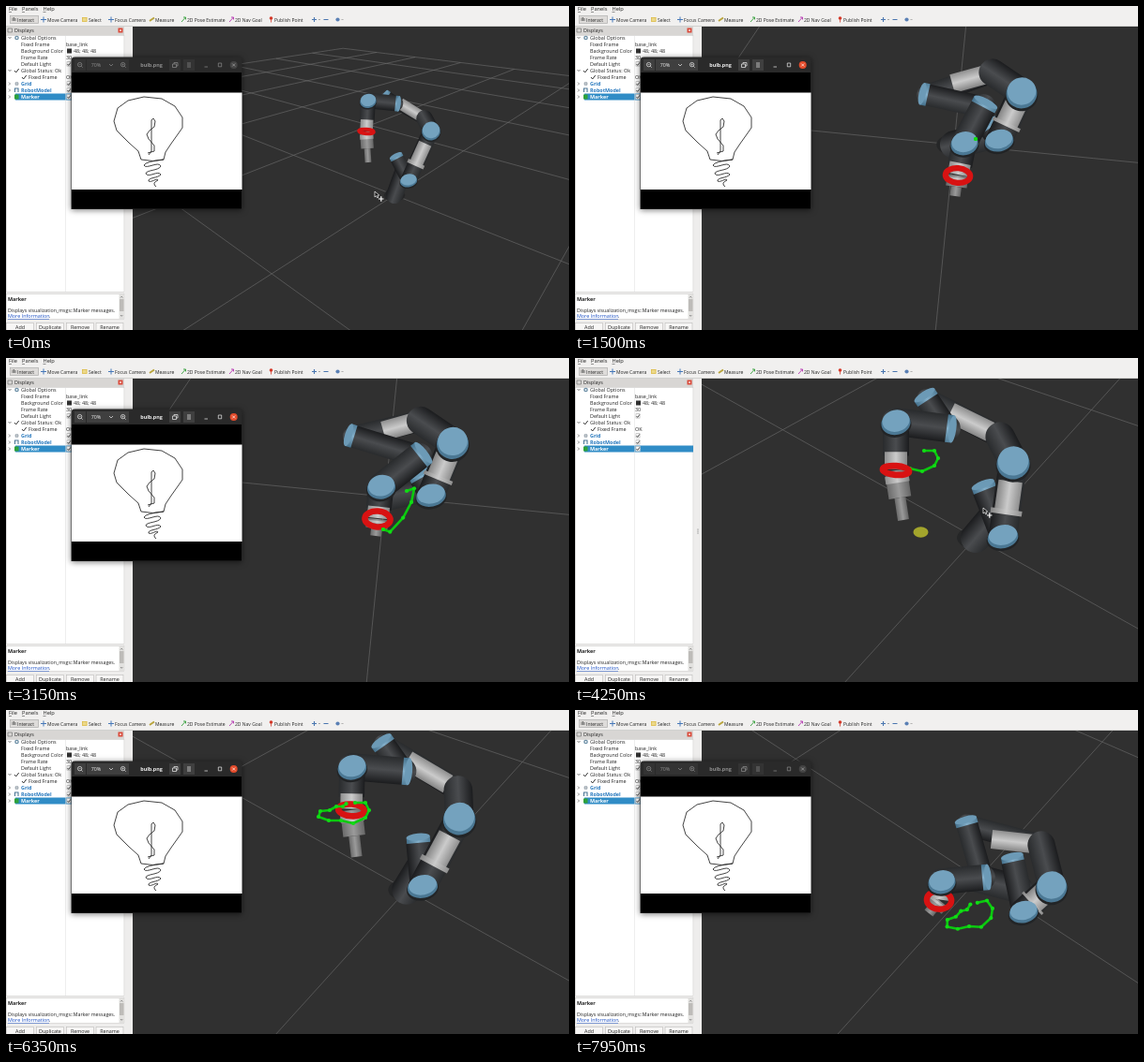
These frames come from a looping animation (600x346 px, 8000 ms). An HTML page with a canvas:

```html
<!DOCTYPE html>
<html lang="en">
<head>
<meta charset="utf-8">
<title>Robot arm drawing</title>
<style>
html, body { margin: 0; width: 100%; height: 100%; overflow: hidden; background: #303030; }
canvas { display: block; width: 600px; height: 346px; }
</style>
</head>
<body>
<canvas id="stage" width="600" height="346"></canvas>
<script>
const g = document.getElementById('stage').getContext('2d');
const LOOP = 8000, FOCAL = 391, CENTER = [367, 184];

const mix = (a, b, k) => a + (b - a) * k;
const mixList = (a, b, k) => a.map((v, i) => mix(v, b[i], k));
const smooth = k => k * k * (3 - 2 * k);

// keys: [time, value list]; eased between neighbours, held at the end
function sample(keys, t) {
  const n = keys.findIndex(key => key[0] > t);
  if (n < 0) return keys[keys.length - 1][1];
  const [t0, a] = keys[n - 1], [t1, b] = keys[n];
  return mixList(a, b, smooth((t - t0) / (t1 - t0)));
}

// ---------- basic drawing ----------
function box(x, y, w, h, fill, stroke) {
  if (fill) { g.fillStyle = fill; g.fillRect(x, y, w, h); }
  if (stroke) { g.strokeStyle = stroke; g.lineWidth = .6; g.strokeRect(x + .5, y + .5, w - 1, h - 1); }
}
function dot(x, y, r, fill) {
  g.fillStyle = fill; g.beginPath(); g.arc(x, y, r, 0, 7); g.fill();
}
function poly(points, color, width = .7) {
  g.strokeStyle = color; g.lineWidth = width;
  g.beginPath(); points.forEach(p => g.lineTo(p[0], p[1])); g.stroke();
}
function path(d, color, width = .7) {
  g.strokeStyle = color; g.lineWidth = width; g.stroke(new Path2D(d));
}
function text(s, x, y, { size = 5.4, color = '#222', bold = false, align = 'left' } = {}) {
  g.font = `${bold ? 'bold ' : ''}${size}px "Open Sans", sans-serif`;
  g.textAlign = align; g.fillStyle = color; g.fillText(s, x, y);
}

// ---------- cameras: pitch, yaw, distance, base x, y, then trail transform ----------
const FAR = [.47, .72, 2.4, 414, 202, 402, 183, .73, -.74, -.25, 1.96];
const TOP = [.95, .13, 1.35, 404, 148, 402, 183, .73, -.74, -.25, 1.96];
const SIDE = [.85, .67, 1.2, 427, 192, 357, 118, 1, 0, 0, 1];
const TILT = [1, .7, 1.3, 430, 180, 420, 231, .93, .27, -.21, 1.16];
const cameraKeys = [[0, FAR], [1450, TOP], [3450, TOP], [4250, SIDE], [7200, SIDE], [7650, TILT]];

function drawGrid([pitch, yaw, dist, ox, oy]) {
  const sp = Math.sin(pitch), cp = Math.cos(pitch), sy = Math.sin(yaw), cy = Math.cos(yaw);
  const x0 = (ox - CENTER[0]) / FOCAL * dist, y0 = (CENTER[1] - oy) / FOCAL * dist;
  const project = (x, y) => {
    const right = x * cy + y * sy, ahead = y * cy - x * sy, z = dist + ahead * cp;
    return z < .12 ? null : [CENTER[0] + FOCAL * (x0 + right) / z, CENTER[1] - FOCAL * (y0 + ahead * sp) / z];
  };
  for (let i = -5; i <= 5; i++) {
    const along = [], across = [];
    for (let j = -5; j <= 5; j += .25) { along.push(project(i, j)); across.push(project(j, i)); }
    poly(along.filter(Boolean), '#747474', .55);
    poly(across.filter(Boolean), '#747474', .55);
  }
}

// ---------- arm ----------
// unit, then: base disc, shoulder cap, elbow disc, elbow back, forearm end,
// wrist cap, second wrist cap, tool top, ring, gripper tip
const REST = [9, 429, 186, 417, 163, 453, 133, 446, 120, 420, 104, 406, 98, 415, 104, 386, 101, 384, 134, 386, 167];
const START = [15, 452, 143, 443, 130, 476, 92, 445, 71, 402, 83, 376, 95, 435, 108, 415, 146, 408, 181, 405, 203];
const ARC = [15.5, 453, 146, 443, 128, 476, 90, 442, 67, 402, 78, 371, 84, 440, 105, 400, 137, 396, 172, 394, 190];
const BOTTOM = [16, 456, 190, 437, 141, 467, 111, 453, 84, 400, 58, 376, 45, 396, 75, 342, 68, 342, 120, 350, 173];
const LEFT = [16, 457, 190, 443, 143, 501, 112, 484, 84, 437, 59, 409, 44, 438, 74, 383, 65, 381, 121, 384, 173];
const CLOSED = [15.5, 433, 186, 437, 141, 468, 118, 480, 87, 420, 49, 399, 33, 410, 58, 357, 57, 357, 95, 365, 143];
const STEM = [15, 478, 215, 467, 162, 508, 188, 497, 144, 444, 138, 418, 123, 434, 179, 391, 183, 388, 203, 377, 217];
const poseKeys = [[0, REST], [1500, START], [3150, ARC], [3450, ARC], [4250, BOTTOM],
  [5400, LEFT], [7200, CLOSED], [7650, STEM]];

const DARK = ['#1b1c1e', '#4a4c4f', '#292b2d'], LIGHT = ['#858585', '#cbcbcb', '#8f8f8f'];
const BLUE = ['#45718c', '#83afca', '#537f99'], GRAY = ['#666', '#9a9a9a', '#6b6b6b'];
const between = (a, b, k) => mixList(a, b, k);

function tube(a, b, w, colors, cap = 'butt') {
  const dx = b[0] - a[0], dy = b[1] - a[1], len = Math.hypot(dx, dy) || 1;
  const nx = -dy / len * w / 2, ny = dx / len * w / 2;
  const shade = g.createLinearGradient(a[0] - nx, a[1] - ny, a[0] + nx, a[1] + ny);
  colors.forEach((c, i) => shade.addColorStop(i / 2, c));
  g.lineCap = cap;
  poly([a, b], shade, w);
  g.lineCap = 'butt';
}
function endCap(from, to, unit, w) {
  const a = Math.atan2(to[1] - from[1], to[0] - from[0]);
  const out = [to[0] + Math.cos(a) * unit * .4, to[1] + Math.sin(a) * unit * .4];
  tube(to, out, w, BLUE);
  g.fillStyle = '#6c9ab6';
  g.beginPath(); g.ellipse(out[0], out[1], unit * .25, w / 2, a, 0, 7); g.fill();
}
function disc(p, r, squash = .8) {
  const oval = (dy, scale, fill) => {
    g.fillStyle = fill;
    g.beginPath(); g.ellipse(p[0], p[1] + dy, r * scale, r * squash * scale, -.2, 0, 7); g.fill();
  };
  oval(r * .22, 1.06, '#222426');
  oval(r * .1, 1, '#4b7894');
  oval(-r * .06, .93, '#74a2be');
}

function drawBody(p, u, ground) {
  const [base, shoulder, elbow, back, foreEnd, wrist] = p;
  g.fillStyle = '#252627';
  g.beginPath(); g.ellipse(ground[0], ground[1], u * 1.25, u * .75, 0, 0, 7); g.fill();
  tube(ground, between(base, shoulder, .45), u * 2, DARK, 'round');
  tube(base, shoulder, u * 1.7, DARK);
  endCap(base, shoulder, u, u * 1.6);
  tube(base, elbow, u * 1.9, DARK, 'round');
  tube(between(base, elbow, .34), between(base, elbow, .74), u * 1.6, LIGHT);
  tube(between(base, elbow, .29), between(base, elbow, .36), u * 2.1, LIGHT);
  disc(base, u * 1.03, .7);
  tube(back, wrist, u * 1.5, DARK, 'round');
  tube(between(back, foreEnd, .2), foreEnd, u * 1.35, LIGHT);
  tube(back, elbow, u * 1.95, DARK, 'round');
  disc(elbow, u * 1.1, .95);
}
function drawWrist(p, u) {
  const [wrist, side, top, ring, tip] = p.slice(5);
  tube(wrist, side, u * 1.55, DARK, 'round');
  endCap(side, wrist, u, u * 1.6);
  tube(side, top, u * 1.85, DARK, 'round');
  endCap(top, side, u, u * 1.85);

  const palm = between(ring, tip, .55);
  tube(ring, palm, u * 1.5, GRAY);
  tube(palm, tip, u * .75, GRAY);
  tube(between(ring, tip, .1), between(ring, tip, .25), u * 1.6, LIGHT);
  tube(top, between(top, ring, .7), u * 1.75, DARK);
  tube(between(top, ring, .62), between(top, ring, .97), u * 1.5, LIGHT);

  const len = Math.hypot(ring[0] - top[0], ring[1] - top[1]) / (3.6 * u);
  const open = Math.max(.25, .7 * Math.sqrt(Math.max(0, 1 - len * len)));
  g.strokeStyle = '#d81212'; g.lineWidth = u * .42;
  g.beginPath(); g.ellipse(ring[0], ring[1], u * .88, u * open, .08, 0, 7); g.stroke();
  disc(top, u * .98, .8);
}

// ---------- drawn trail ----------
const TRAIL = [[372, 99], [383, 99], [387, 107], [383, 115], [370, 121], [357, 118], [344, 118],
  [333, 114], [335, 108], [345, 107], [352, 103], [359, 103], [364, 99]];
const trailKeys = [[0, [0]], [1500, [0]], [3150, [5]], [4250, [5.3]], [5400, [11.4]], [7200, [12]]];

function drawTrail(camera, t) {
  const [tx, ty, a, b, c, d] = camera.slice(5), [count] = sample(trailKeys, t);
  if (!count) return;
  const whole = Math.floor(count), points = TRAIL.slice(0, whole + 1);
  if (count > whole) points.push(between(TRAIL[whole], TRAIL[whole + 1], count - whole));
  const seen = points.map(([x, y]) => [tx + a * (x - 357) + b * (y - 118), ty + c * (x - 357) + d * (y - 118)]);
  g.lineCap = g.lineJoin = 'round';
  poly(seen, '#0bc90f', 2.6);
  g.lineCap = 'butt';
  seen.forEach(p => dot(p[0], p[1], 2.1, '#11dc15'));
}

function drawScene(t) {
  const camera = sample(cameraKeys, t), [unit, ...flat] = sample(poseKeys, t);
  const joints = Array.from({ length: 10 }, (_, i) => flat.slice(2 * i, 2 * i + 2));
  const trailInFront = t < 3500 || t > 6000;
  g.save();
  g.beginPath(); g.rect(135, 22, 465, 324); g.clip();
  box(135, 22, 465, 324, '#303030');
  drawGrid(camera);
  const orbiting = (t > 50 && t < 1400) || (t > 3500 && t < 4300) || (t > 7250 && t < 7600);
  if (orbiting) {
    g.fillStyle = '#a3a52c';
    g.beginPath(); g.ellipse(368.5, 186, 8, 5.8, 0, 0, 7); g.fill();
  }
  drawBody(joints, unit, [camera[3], camera[4]]);
  if (!trailInFront) drawTrail(camera, t);
  drawWrist(joints, unit);
  if (trailInFront) drawTrail(camera, t);
  g.restore();
}

// ---------- interface ----------
const TOOLS = [['Interact', 12, '#777'], ['Move Camera', 44, '#4778b8'], ['Select', 88, '#d9b640'],
  ['Focus Camera', 116, '#4778b8'], ['Measure', 159, '#b9a43c'], ['2D Pose Estimate', 193, '#35a03a'],
  ['2D Nav Goal', 244, '#b535b0'], ['Publish Point', 286, '#d43a2a']];
const ROWS = [['Global Options'], ['Fixed Frame', 'base_link'], ['Background Color', '48; 48; 48'],
  ['Frame Rate', '30'], ['Default Light', true], ['Global Status: Ok'], ['Fixed Frame', 'OK'],
  ['Grid', true], ['RobotModel', true], ['Marker', true]];

function drawTool([label, x, color], i) {
  if (i === 0) { box(4, 10, 31, 9, '#dedcda', '#aaa'); path('M7 16V12.5M8.5 16V12M10 16V13', '#555', .8); }
  else if (i === 2) box(x - 7, 12, 5.5, 5, '#ecd98a', color);
  else if (i === 1 || i === 3) path(`M${x - 7} 14.5H${x - 1}M${x - 4} 11.5V17.5`, color, 1);
  else if (i === 4) path(`M${x - 6} 16L${x - 1} 12.5`, color, 2);
  else if (i === 7) { dot(x - 3.5, 13, 1.8, color); path(`M${x - 3.5} 14V17.5`, color, .8); }
  else path(`M${x - 6} 17L${x - 1.5} 12M${x - 4} 12H${x - 1.5}V14.5`, color, .9);
  text(label, x, 16.7, { size: 5 });
}

function drawCheck(y) {
  box(64.5, y - 2.8, 5, 5.4, '#fff', '#aaa');
  path(`M65.5 ${y}l1.2 1.4 2.2-3`, '#222', .8);
}

function drawRow([label, value], i) {
  const y = 34 + 7 * i, display = i > 6, chosen = i === 9;
  if (chosen) box(10, y - 3.5, 116, 7, '#308cc6');
  if ([0, 5].includes(i)) path(`M2.5 ${y - 1}l1.5 1.6 1.5-1.6`, '#444');
  if (display) path(`M3 ${y - 1.5}l1.5 1.5-1.5 1.5`, '#555');
  if (i === 0) { dot(11.5, y, 2.3, '#6f91a8'); dot(11.5, y, .9, '#fff'); }
  if (i === 5) path(`M9 ${y}l1.7 2 3-4`, '#222', .9);
  if (i === 6) path(`M17 ${y}l1.7 2 3-4`, '#222', .9);
  if (i === 7) { dot(11.5, y, 2, '#8d9aa5'); path(`M9 ${y}H14M11.5 ${y - 2.5}V${y + 2.5}`, '#e8e8e8', .5); }
  if (i === 8) path(`M9.5 ${y + 2}V${y - 2}H13V${y + 2}`, '#4d7796', 1.1);
  if (chosen) box(9, y - 2.5, 4.5, 5, '#2fa23b');
  const color = chosen ? '#fff' : display ? '#2577bd' : '#222';
  text(label, i === 6 ? 24 : 16, y + 2, { color: color, bold: display });
  if (value === true) drawCheck(y);
  else if (i === 2) { box(65, y - 2.5, 5, 5, '#303030'); text(value, 72, y + 2); }
  else if (value) text(value, 64, y + 2);
}

function drawPanels() {
  box(0, 0, 600, 22, '#f1f0ef');
  box(0, 22, 135, 324, '#eeedec');
  [['File', 3], ['Panels', 17], ['Help', 39.5]].forEach(([label, x]) => {
    text(label, x, 5.4, { size: 5.7 });
    box(x, 6.4, 3, .5, '#333');
  });
  TOOLS.forEach(drawTool);
  path('M326 14.5H331M328.5 12V17M338.5 14.5H343.5', '#4a76b0', 1.1);
  path('M333 14l1 1 1-1M357.5 14l1 1 1-1', '#777', .6);
  dot(353.5, 14.5, 2.1, '#5b80b5');
  box(0, 21.3, 600, .7, '#c5c4c2');

  box(0, 22, 126, 9, '#d8d6d4');
  path('M2 24H6.5V28H2Z', '#777');
  text('Displays', 9, 28.3);
  box(119.5, 23.5, 5, 5, '#d94a3a');
  path('M121 25l2 2m0-2l-2 2', '#fff', .6);
  box(0, 31, 126.5, 275, '#fff', '#c6c5c3');
  ROWS.forEach(drawRow);
  box(63, 31, .5, 275, '#ddd');
  for (let y = 183; y < 188; y += 2) dot(131, y, .6, '#666');

  box(0, 307, 126.5, 28, '#fff', '#c6c5c3');
  text('Marker', 2, 315, { bold: true });
  text('Displays visualization_msgs::Marker messages.', 2, 327, { size: 5.25 });
  text('More Information', 2, 333.3, { color: '#1a4fc4' });
  text('.', 46, 333.3);
  box(2, 334, 44, .5, '#1a4fc4');
  box(120.5, 308, 5.5, 26, '#e2e1df');
  box(121, 313, 4.5, 13, '#bdbbb8');
  path('M122 311.5l1.2-1.3 1.2 1.3M122 330l1.2 1.3 1.2-1.3', '#555', .6);
  [['Add', 15], ['Duplicate', 47], ['Remove', 79], ['Rename', 110.5]].forEach(([label, x]) => {
    box(x - 15, 338, 30, 11, '#f7f6f5', '#b9b8b6');
    text(label, x, 345, { align: 'center' });
  });
}

const BULB = 'M151 157L158 155 158 149 152 142 150 137 153 133 158 129 159 123 157 120 155 122 155 155 152 159' +
  'M144 164L141 155 131 146 118 133 115 123 119 109 130 101 147 97 166 99 180 107 188 119 188 130 176 147 170 156 168 164' +
  'Q157 167 144 164M168 164Q149 166 147 170C149 175 163 165 165 171C163 176 149 175 149 179' +
  'C152 184 162 175 165 180C162 184 151 183 152 187C155 189 161 183 162 186Q155 189 160 193';

function drawViewer(focused) {
  const ink = focused ? '#eee' : '#8d8d8d', chip = focused ? '#3f3f3f' : '#333';
  g.save();
  g.shadowColor = 'rgba(0,0,0,.55)'; g.shadowBlur = 6; g.shadowOffsetY = 1;
  g.fillStyle = '#2a2a2a';
  g.beginPath(); g.roundRect(69.5, 54.5, 182, 162.5, [4, 4, 0, 0]); g.fill();
  g.restore();
  box(70, 71, 181, 145.5, '#000');
  box(70, 92.5, 181.5, 103.5, '#fff');
  [[73, 12], [86, 33], [119, 12], [174, 12], [189, 12]].forEach(([x, w]) => box(x, 57, w, 12, chip));
  [79, 125].forEach((x, plus) => {
    g.strokeStyle = ink; g.lineWidth = .7;
    g.beginPath(); g.arc(x - .4, 62.6, 2.2, 0, 7); g.stroke();
    path(`M${x + 1.2} 64.2l1.6 1.6M${x - 1.4} 62.6h2` + (plus ? `M${x - .4} 61.6v2` : ''), ink, .6);
  });
  text('70%', 96, 65, { color: ink, align: 'center' });
  path('M110 62l2 2 2-2M177.5 62h4v3.5h-4ZM179 62v-1.5h4v3.5h-1.5', ink);
  path('M193 61h4M193 63h4M193 65h4M211.5 65h3.5M226.3 61h3.4v3.8h-3.4Z', ink);
  text('bulb.png', 155, 65, { color: ink, bold: true, align: 'center' });
  dot(242.7, 63, 4, focused ? '#e34b2b' : '#444');
  path('M241.2 61.5l3 3m0-3l-3 3', focused ? '#fff' : '#aaa', .7);
  path(BULB, '#222', .85);
}

function drawCursor(t) {
  const spot = t < 1300 ? sample([[0, [393, 198]], [1300, [360, 235]]], t)
    : t > 3500 && t < 4450 ? sample([[3500, [385, 140]], [4250, [435, 160]]], t)
    : t > 6900 && t < 7600 ? sample([[6900, [376, 160]], [7200, [383, 170]], [7600, [398, 182]]], t) : null;
  if (!spot) return;
  g.save();
  g.translate(spot[0], spot[1]);
  const arrow = new Path2D('M0 0L0 6 1.6 4.8 2.8 7 3.8 6.4 2.8 4.3 4.7 4Z');
  g.fillStyle = '#111'; g.fill(arrow);
  g.strokeStyle = '#fff'; g.lineWidth = .7; g.stroke(arrow);
  path('M4 8H9.5M6.8 5.3V10.7', '#fff', 1.2);
  g.restore();
}

function frame(now) {
  const t = now % LOOP;
  drawScene(t);
  drawPanels();
  if (t < 3700 || t > 4700) drawViewer(t > 1400 && t < 7500);
  drawCursor(t);
  requestAnimationFrame(frame);
}
requestAnimationFrame(frame);
</script>
</body>
</html>
```
